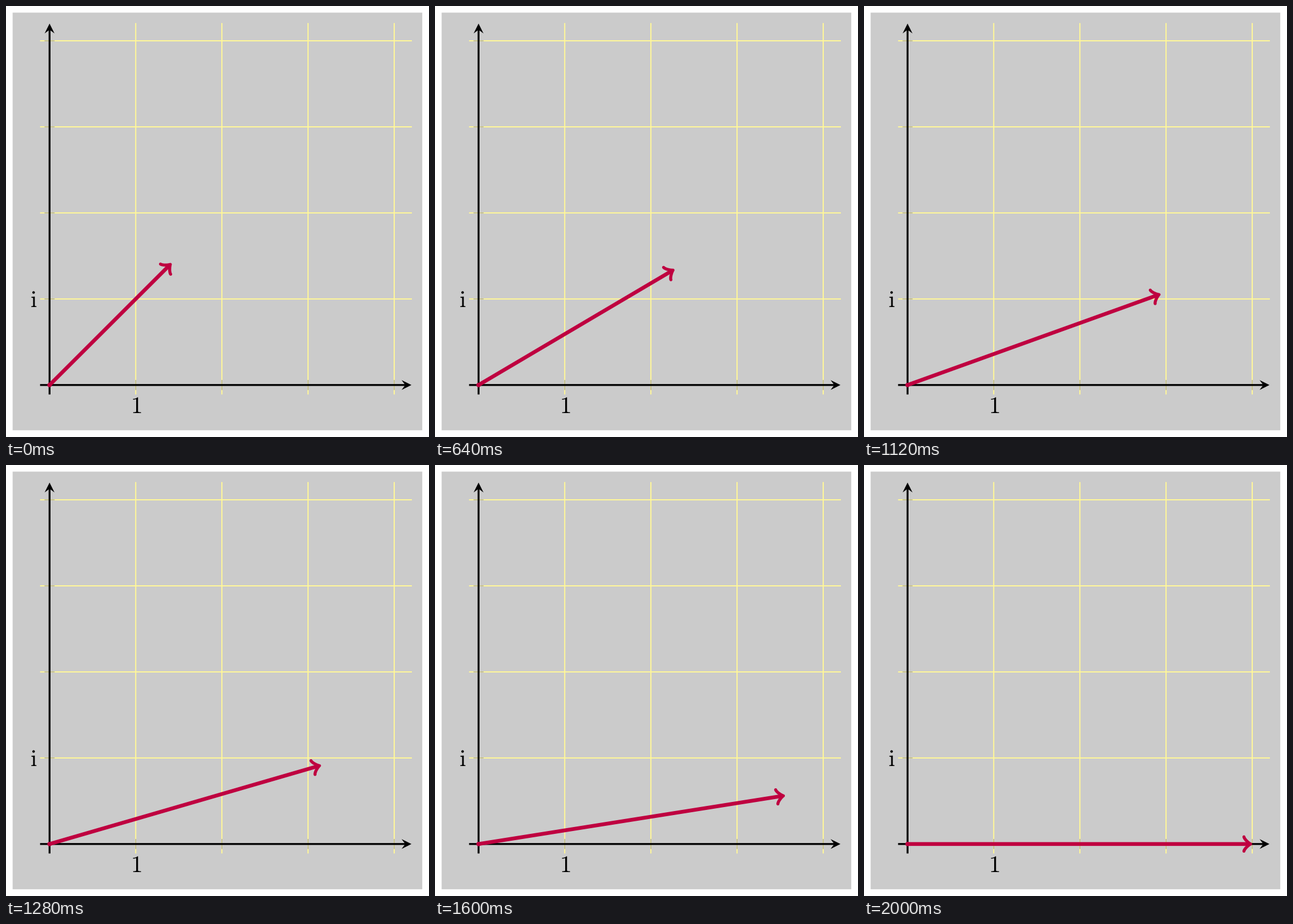
These frames come from a looping animation (741x756 px, 4000 ms). A matplotlib script:

```python
import math

import numpy as np
import matplotlib.pyplot as plt
from matplotlib.animation import FuncAnimation
from matplotlib.patches import Circle, PathPatch, Polygon, Rectangle
from matplotlib.path import Path

W, H, DPI = 741, 756, 64
OX, OY, UNIT = 76.3, 664.8, 150.94
PT = 300 / 72.27            # pixels per drawing point
LOW, HIGH = 16.6, 4.2 * UNIT
STEP_MS, STEPS, MOVE = 20, 200, 100

GREY, YELLOW, PURPLE = "#cbcbcb", "#fff799", "#bf0040"

plt.rcParams["path.snap"] = False
plt.rcParams["text.hinting"] = "none"

fig = plt.figure(figsize=(W / DPI, H / DPI), dpi=DPI, facecolor="white")
ax = fig.add_axes([0, 0, 1, 1])
ax.set_xlim(0, W)
ax.set_ylim(H, 0)
ax.axis("off")


def width(px):
    return px * 72 / DPI


def line(x0, y0, x1, y1, color, px, z):
    return ax.plot([x0, x1], [y0, y1], color=color, lw=width(px), zorder=z,
                   solid_capstyle="butt")[0]


def local(points, x, y, angle):
    """Place points given along/across a direction at pixel (x, y)."""
    c, s = math.cos(angle), math.sin(angle)
    p = np.asarray(points, float)
    return np.column_stack([x + c * p[:, 0] - s * p[:, 1],
                            y - s * p[:, 0] - c * p[:, 1]])


def axis(x0, y0, x1, y1, angle):
    d = (0.28 + 0.3 * 0.8) * PT
    head = np.array([(0, 0), (-8, 4), (-5, 0), (-8, -4)]) * d
    ax.add_patch(Polygon(local(head, x1, y1, angle), fc="black", lw=0,
                         zorder=4))
    ex, ey = local([(-4.8 * d, 0)], x1, y1, angle)[0]
    line(x0, y0, ex, ey, "black", 0.8 * PT, 4)


def label(x, y, text):
    ax.text(x, y, rf"$\mathrm{{{text}}}$", math_fontfamily="cm",
            fontsize=width(10 * PT), ha="center", va="baseline", zorder=5)


# Plane, grid and ticks
ax.add_patch(Rectangle((11.6, 11.6), 717.6, 732.6, fc=GREY, lw=0, zorder=0))
tick = 2.13 * PT
for k in range(1, 5):
    gx, gy = OX + k * UNIT, OY - k * UNIT
    line(gx, OY + LOW, gx, OY - HIGH - 1, YELLOW, 0.5 * PT, 1)
    line(OX - LOW, gy, OX + HIGH + 0.8, gy, YELLOW, 0.5 * PT, 1)
    line(gx, OY - tick, gx, OY + tick, "#808080", 0.2 * PT, 2)
    line(OX - tick, gy, OX + tick, gy, "#808080", 0.2 * PT, 2)

axis(OX - LOW, OY, OX + HIGH, OY, 0)
axis(OX, OY + LOW, OX, OY - HIGH, math.pi / 2)
label(227.8, 714, "1")
label(48, 527.5, "i")

# Vector
SHAFT = 1.6 * PT
D = 0.28 * PT + 0.3 * SHAFT
HEAD = np.array([(-3, 4), (-2.75, 2.5), (0, 0.25), (0.75, 0),
                 (0, -0.25), (-2.75, -2.5), (-3, -4)]) * D
BACK = 0.21 * PT + 0.625 * SHAFT
CODES = [Path.MOVETO] + [Path.CURVE4] * 6

ax.add_patch(Circle((OX, OY), 3.9, fc=PURPLE, lw=0, zorder=6))
shaft = line(OX, OY, OX, OY, PURPLE, SHAFT, 6)
head = PathPatch(Path(HEAD, CODES), fill=False, ec=PURPLE,
                 lw=width(0.8 * SHAFT), capstyle="round", joinstyle="round",
                 zorder=6)
ax.add_patch(head)


def update(n):
    t = min(n / MOVE, 1)
    angle = math.pi / 4 * (1 - t)
    reach = (2 + 2 * t) * UNIT - BACK
    x, y = local([(reach, 0)], OX, OY, angle)[0]
    shaft.set_data([OX, x], [OY, y])
    head.set_path(Path(local(HEAD, x, y, angle), CODES))
    return shaft, head


anim = FuncAnimation(fig, update, frames=STEPS, interval=STEP_MS,
                     init_func=lambda: update(0), repeat=True, repeat_delay=0)
plt.show()
```
